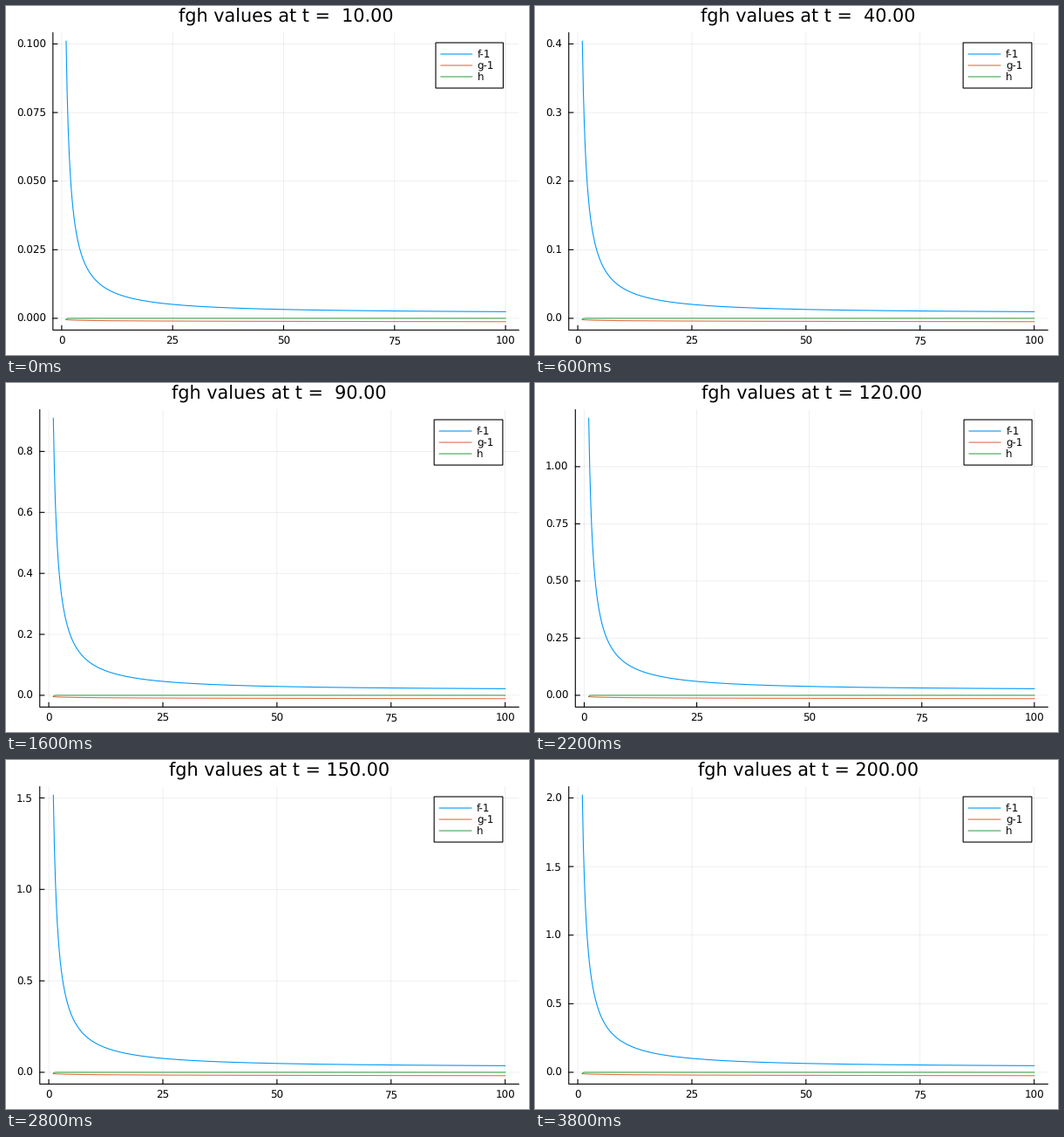
Animation of 600 by 400 pixels, one loop 4000 ms. Source, as a matplotlib script:

```python
import matplotlib.pyplot as plt
import numpy as np
from matplotlib.animation import FuncAnimation

PX = 0.72  # points per pixel at 100 dpi
plt.rcParams.update({"font.family": "DejaVu Sans", "text.hinting": "none"})

TOP, BOTTOM, RIGHT = 30.7, 371.4, 588.2
SMALL, LARGE = 11.9 * PX, 20.8 * PX
BLUE, ORANGE, GREEN = "#009afa", "#e36f47", "#3ea44e"

# y tick spacing for t = 10, 20, ..., 200
STEPS = ([0.025, 0.05] + [0.1] * 4 + [0.2] * 3 + [0.25] * 3
         + [0.2, 0.3] + [0.5] * 6)
FRAMES = len(STEPS)

r = np.linspace(1, 100, 900)
SHAPES = [
    (0.01008 / r + 0.00002 + 0.000026 * np.log(r), BLUE, "f-1"),
    (-0.00005 - 0.0000155 * np.log(r), ORANGE, "g-1"),
    (-0.00005 / r**8, GREEN, "h"),
]

fig = plt.figure(figsize=(6, 4), dpi=100, facecolor="white")
ax = fig.add_axes([0, 0, 1, 1])


def decimals(step):
    return next(d for d in (1, 2, 3) if abs(round(step, d) - step) < 1e-9)


def line(x, y, color="black", width=1.1, **kw):
    ax.plot(x, y, color=color, lw=width * PX, snap=False, **kw)


def label(x, y, text, size=SMALL, ha="left"):
    ax.text(x, y, text, fontsize=size, ha=ha, va="baseline", color="black",
            zorder=6)


def legend(width):
    pad = width / 90
    right = RIGHT - width / 30
    left = right - width / 15 - 2 * pad - 29.9
    top = TOP + (BOTTOM - TOP) / 30
    ax.add_patch(plt.Rectangle((left, top), right - left, 52, fc="white",
                               ec="black", lw=1.1 * PX, snap=False, zorder=4))
    for i, (_, color, name) in enumerate(SHAPES):
        y = top + 13 * (i + 1)
        x0 = left + pad
        x1 = x0 + width / 15
        line([x0, x1], [y, y], color, zorder=5)
        label(x1 + pad, y + 4.3, name)


def draw(i):
    ax.clear()
    ax.set(xlim=(0, 600), ylim=(400, 0))
    ax.axis("off")

    t = 10 * (i + 1)
    step = STEPS[i]
    places = decimals(step)
    left = 31.2 + 7.55 * places
    width = RIGHT - left

    hi = max(s.max() for s, _, _ in SHAPES) * t
    lo = min(s.min() for s, _, _ in SHAPES) * t
    pad = 0.03 * (hi - lo)
    y_scale = (BOTTOM - TOP) / (hi - lo + 2 * pad)
    x_scale = width / (99 * 1.06)

    def to_x(v):
        return left + (v - 1 + 2.97) * x_scale

    def to_y(v):
        return BOTTOM - (v - lo + pad) * y_scale

    grid = dict(alpha=0.1, width=0.6, zorder=1)
    for v in range(0, 101, 25):
        x = to_x(v)
        line([x, x], [TOP, BOTTOM], **grid)
        line([x, x], [BOTTOM, BOTTOM - 5], zorder=3)
        label(x, 387.6, str(v), ha="center")
    for k in range(int(hi / step + 1e-9) + 1):
        y = to_y(k * step)
        line([left, RIGHT], [y, y], **grid)
        line([left, left + 5], [y, y], zorder=3)
        label(11.8, y + 4.3, f"{k * step:.{places}f}")

    line([left, left, RIGHT], [TOP, BOTTOM, BOTTOM], zorder=3)
    for shape, color, _ in SHAPES:
        line(to_x(r), to_y(shape * t), color, zorder=2)

    legend(width)
    label((left + RIGHT) / 2, 18.5, f"fgh values at t = {t:6.2f}", LARGE, "center")
    return []


anim = FuncAnimation(fig, draw, frames=FRAMES, interval=200, repeat=True,
                     repeat_delay=0)
plt.show()
```
